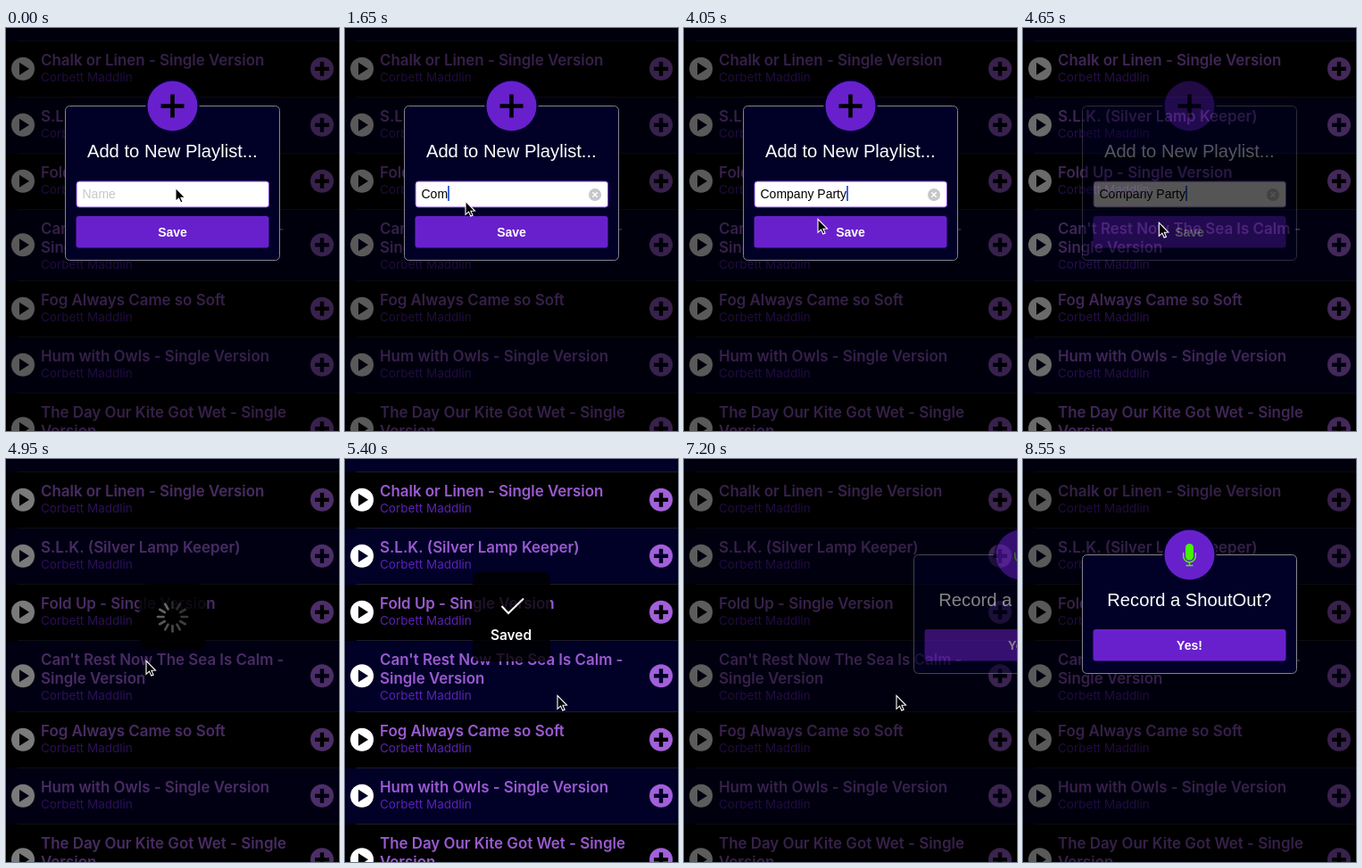
Recreate the animation shown at these times as an HTML page with a canvas. Size 373 by 452 pixels, loop 9.34 s.

```html
<!DOCTYPE html>
<html lang="en">
<head>
<meta charset="utf-8">
<title>Add to playlist</title>
<style>
html, body { margin: 0; width: 373px; height: 452px; overflow: hidden; background: #000; }
canvas { display: block; width: 373px; height: 452px; }
</style>
</head>
<body>
<canvas id="stage" width="373" height="452"></canvas>
<script>
const W = 373, H = 452, LOOP = 9340, STEP = 150;
const UI = 'Inter, "Open Sans", sans-serif';
const FORM = '"Liberation Sans", Arial, sans-serif';
const NAVY = '#010026', PURPLE = '#6820cc';
const ARTIST = 'Corbett Maddlin';
const TYPED = 'Company Party';
const stage = document.getElementById('stage').getContext('2d');
const sheet = document.createElement('canvas');
sheet.width = W;
sheet.height = H;
const sheetCtx = sheet.getContext('2d');
let ctx = stage;

const rows = [
  { top: 14, h: 63, lines: ['Chalk or Linen - Single Version'] },
  { top: 77, h: 63, lines: ['S.L.K. (Silver Lamp Keeper)'] },
  { top: 140, h: 63, lines: ['Fold Up - Single Version'] },
  { top: 203, h: 80, lines: ["Can't Rest Now The Sea Is Calm -", 'Single Version'] },
  { top: 283, h: 63, lines: ['Fog Always Came so Soft'] },
  { top: 346, h: 63, lines: ['Hum with Owls - Single Version'] },
  { top: 409, h: 80, lines: ['The Day Our Kite Got Wet - Single', 'Version'] }
];

// Times at which each character of the playlist name appears
const keys = [1200, 1500, 1650, 1950, 2100, 2250, 2550, 2700, 2850, 3150, 3300, 3450, 3600];

const pointer = [
  [0, 190, 179], [300, 135, 194], [3900, 135, 194], [4050, 150, 214], [4500, 150, 214],
  [4950, 157, 226], [5100, 176, 237], [5400, 238, 265], [7800, 238, 265], [8400, 211, 432]
];
const dimming = [[4350, .65], [4950, .52], [5400, 0], [7050, 0], [7200, .64], [7350, .65]];
const formFade = [[4350, 1], [4800, 0]];
const hudFade = [[4650, 0], [4950, 1], [6300, 1], [6750, 0]];
const hudGrow = [[4950, 0], [5250, 1]];
const askSlide = [[7200, 191], [7350, 40], [7500, 0]];
const askFade = [[7050, 0], [7200, .52], [7350, .85], [7500, 1]];

function at(track, t, i = 1) {
  if (t <= track[0][0]) return track[0][i];
  for (let k = 1; k < track.length; k++) {
    const a = track[k - 1], b = track[k];
    if (t <= b[0]) return a[i] + (b[i] - a[i]) * (t - a[0]) / (b[0] - a[0]);
  }
  return track[track.length - 1][i];
}

function text(str, x, y, font, color, align = 'left') {
  ctx.font = font;
  ctx.fillStyle = color;
  ctx.textAlign = align;
  ctx.fillText(str, x, y);
}

function disc(x, y, r, color) {
  ctx.fillStyle = color;
  ctx.beginPath();
  ctx.arc(x, y, r, 0, Math.PI * 2);
  ctx.fill();
}

function box(x, y, w, h, r, fill, stroke) {
  ctx.beginPath();
  ctx.roundRect(x, y, w, h, r);
  ctx.fillStyle = fill;
  ctx.fill();
  if (stroke) {
    ctx.strokeStyle = stroke;
    ctx.lineWidth = 1;
    ctx.stroke();
  }
}

function line(points, color, width, cap = 'butt') {
  ctx.strokeStyle = color;
  ctx.lineWidth = width;
  ctx.lineCap = cap;
  ctx.beginPath();
  points.forEach(([x, y]) => ctx.lineTo(x, y));
  ctx.stroke();
}

function plus(x, y, arm, width, color) {
  line([[x - arm, y], [x + arm, y]], color, width);
  line([[x, y - arm], [x, y + arm]], color, width);
}

function drawList() {
  ctx.fillStyle = NAVY;
  ctx.fillRect(0, 0, W, H);
  rows.forEach(({ top, h, lines }, i) => {
    const mid = top + h / 2 + .3;
    const back = i % 2 ? NAVY : '#000';
    ctx.fillStyle = back;
    ctx.fillRect(0, top + 1, W, h);
    ctx.fillStyle = '#1d1d28';
    ctx.fillRect(13, top, W - 13, 1);

    // Icons are cut out, so the row shows through them
    disc(19, mid, 13, '#fff');
    ctx.fillStyle = back;
    ctx.beginPath();
    ctx.moveTo(15, mid - 7);
    ctx.lineTo(26, mid);
    ctx.lineTo(15, mid + 7);
    ctx.fill();
    disc(354, mid, 13, '#a260da');
    plus(354, mid, 8, 4.4, back);

    lines.forEach((s, n) => text(s, 39, top + 28 + n * 20.7, '600 16.9px ' + UI, '#9a5ad2'));
    text(ARTIST, 39, top + 46 + (lines.length - 1) * 20.7, '13.5px ' + UI, '#5a20b6');
  });
}

function drawCard(top, h, title, label) {
  box(66.5, top, 240, h, 5, NAVY, '#84848e');
  disc(186.5, top, 30, NAVY);
  disc(186.5, top, 28, PURPLE);
  text(title, 186.3, top + 57.5, '20.2px ' + FORM, '#fff', 'center');
  box(78.5, top + h - 49.5, 216, 35.5, 3, PURPLE);
  text(label, 186.5, top + h - 26.5, 'bold 14px ' + FORM, '#fff', 'center');
}

function drawForm(t) {
  drawCard(87.5, 173, 'Add to New Playlist...', 'Save');
  plus(186.5, 87.5, 13, 4.6, '#000');
  box(79, 172, 215.5, 29, 3, '#fff', '#8442e0');

  const name = TYPED.slice(0, keys.filter(k => k <= t).length);
  const font = '14px ' + FORM;
  text(name || 'Name', 85.5, 191, font, name ? '#000' : '#c7c7cd');
  if (t >= 750) {
    const caret = name ? 85.5 + ctx.measureText(name).width : 85;
    ctx.fillStyle = '#3f66dc';
    ctx.fillRect(Math.round(caret), 177, 2, 17);
  }
  if (t >= 1350) {
    disc(280, 187, 7, '#c6c6cb');
    line([[277.3, 184.3], [282.7, 189.7]], '#fff', 1.4);
    line([[282.7, 184.3], [277.3, 189.7]], '#fff', 1.4);
  }
}

function drawAsk() {
  const green = '#44f500';
  drawCard(107.5, 133, 'Record a ShoutOut?', 'Yes!');
  box(182, 95, 9, 18.5, 4.5, green);
  ctx.strokeStyle = green;
  ctx.lineWidth = 1.5;
  ctx.beginPath();
  ctx.moveTo(179.7, 105);
  ctx.lineTo(179.7, 109);
  ctx.arc(186.5, 109, 6.8, Math.PI, 0, true);
  ctx.lineTo(193.3, 105);
  ctx.stroke();
  line([[186.5, 115.5], [186.5, 119]], green, 1.6);
  line([[182.5, 119.5], [190.5, 119.5]], green, 1.5);
}

function drawSpinner(t) {
  const head = Math.floor(t * 12 / 1000);
  for (let i = 0; i < 12; i++) {
    const a = i * Math.PI / 6 - Math.PI / 2;
    const age = (head - i + 120) % 12;
    const g = Math.round(105 - age * 6);
    const c = Math.cos(a), s = Math.sin(a);
    line([[186.5 + 10 * c, 177 + 10 * s], [186.5 + 16.5 * c, 177 + 16.5 * s]],
      `rgb(${g},${g},${g})`, 2.6, 'round');
  }
}

function drawHud(t) {
  const g = at(hudGrow, t);
  const w = 74 + 13 * g, h = 74 + 26 * g;
  box(186.5 - w / 2, 177 - h / 2, w, h, 8, 'rgba(0,0,0,.8)');
  if (t < 5250) return drawSpinner(t);
  line([[175.5, 165], [183, 173], [200, 156.5]], '#fff', 2);
  text('Saved', 186, 202.5, '600 15.4px ' + UI, '#fff', 'center');
}

function drawPointer(x, y) {
  const shape = [[0, .3], [0, 15.3], [3.5, 12.1], [5.8, 17.1], [8.1, 16.1], [5.9, 11.2], [10.5, 11]];
  ctx.beginPath();
  shape.forEach(([dx, dy]) => ctx.lineTo(x + dx, y + dy));
  ctx.closePath();
  ctx.fillStyle = '#000';
  ctx.fill();
  ctx.strokeStyle = '#fff';
  ctx.lineWidth = 1.1;
  ctx.stroke();
}

// Paints on a separate sheet so that a panel fades as one piece
function layer(alpha, dx, paint) {
  if (alpha <= 0) return;
  ctx = sheetCtx;
  ctx.clearRect(0, 0, W, H);
  paint();
  ctx = stage;
  ctx.globalAlpha = alpha;
  ctx.drawImage(sheet, dx, 0);
  ctx.globalAlpha = 1;
}

function draw(now) {
  const t = Math.floor((now % LOOP) / STEP) * STEP;
  drawList();
  ctx.fillStyle = `rgba(0,0,0,${at(dimming, t)})`;
  ctx.fillRect(0, 0, W, H);
  layer(at(formFade, t), 0, () => drawForm(t));
  layer(at(hudFade, t), 0, () => drawHud(t));
  layer(at(askFade, t), at(askSlide, t), drawAsk);
  if (t < 8550) drawPointer(at(pointer, t, 1), at(pointer, t, 2));
}

let start;
function frame(now) {
  start ??= now;
  draw(now - start);
  requestAnimationFrame(frame);
}
draw(0);
requestAnimationFrame(frame);
</script>
</body>
</html>
```
